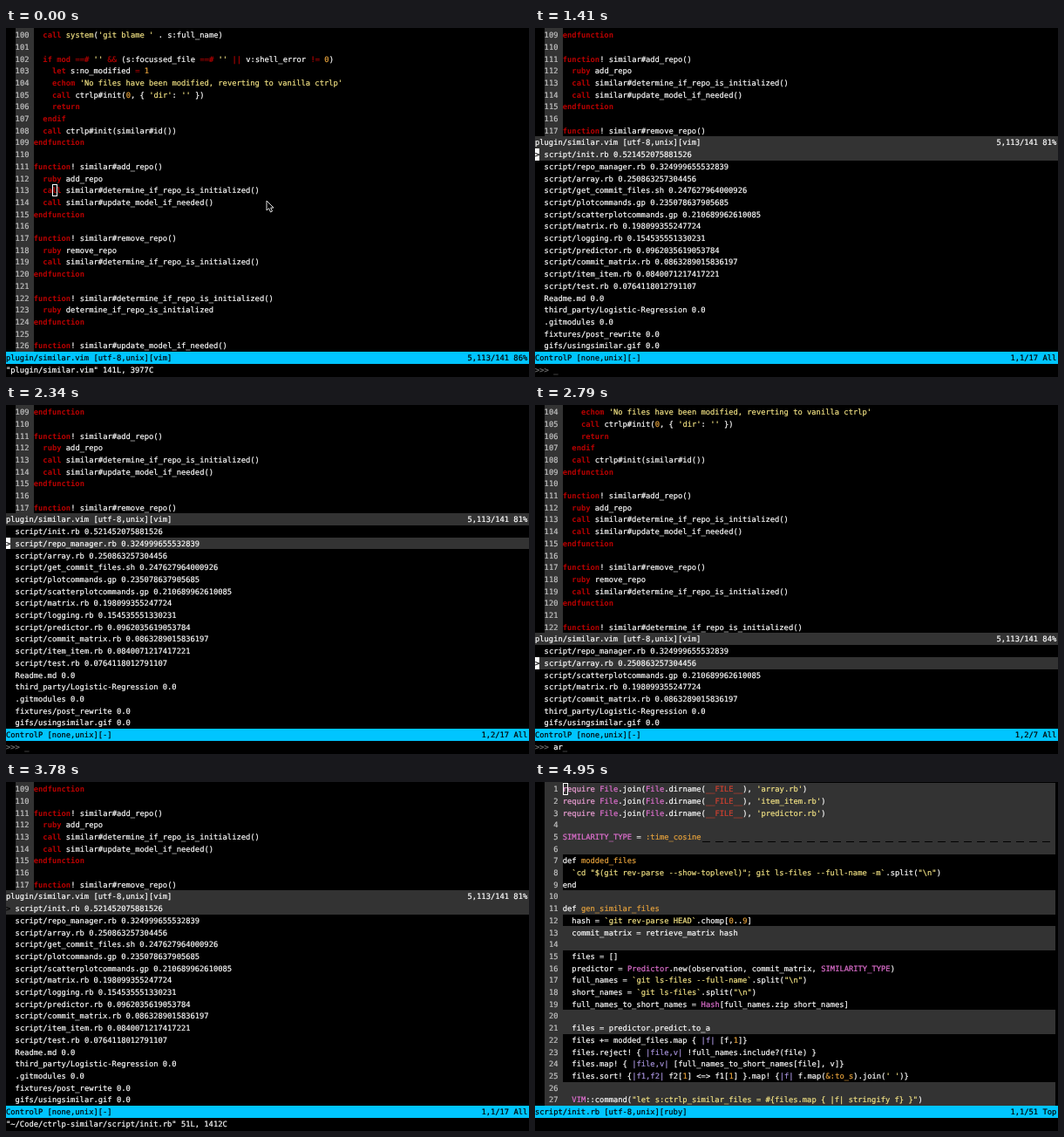
Animation of 600 by 400 pixels, one loop 4980 ms. Source, as an HTML page with a canvas:

```html
<!DOCTYPE html>
<html lang="en">
<head>
<meta charset="utf-8">
<title>Similar files in the editor</title>
<style>
html, body { margin: 0; width: 100%; height: 100%; overflow: hidden; background: #000; }
canvas { display: block; }
</style>
</head>
<body>
<canvas id="stage" width="600" height="400"></canvas>
<script>
const ctx = document.getElementById('stage').getContext('2d');
const LOOP = 4980;
const COLS = 113, CELL = 5.295, LINE = 13.7, TOP = 1.1;
const STATUS_ROW = 27, MESSAGE_ROW = 28;
const WHITE = '#fff', GREY = '#333', CYAN = '#00c5ff', RED = '#b80000';
const YELLOW = '#f3e384', ORANGE = '#e8a33c', PINK = '#e070d0', DIM = '#707070';

const vimCode = `  call system('git blame ' . s:full_name)

  if mod ==# '' && (s:focussed_file ==# '' || v:shell_error != 0)
    let s:no_modified = 1
    echom 'No files have been modified, reverting to vanilla ctrlp'
    call ctrlp#init(0, { 'dir': '' })
    return
  endif
  call ctrlp#init(similar#id())
endfunction

function! similar#add_repo()
  ruby add_repo
  call similar#determine_if_repo_is_initialized()
  call similar#update_model_if_needed()
endfunction

function! similar#remove_repo()
  ruby remove_repo
  call similar#determine_if_repo_is_initialized()
endfunction

function! similar#determine_if_repo_is_initialized()
  ruby determine_if_repo_is_initialized
endfunction

function! similar#update_model_if_needed()`.split('\n');

const rubyCode = String.raw`require File.join(File.dirname(__FILE__), 'array.rb')
require File.join(File.dirname(__FILE__), 'item_item.rb')
require File.join(File.dirname(__FILE__), 'predictor.rb')

SIMILARITY_TYPE = :time_cosine

def modded_files
  ~cd "$(git rev-parse --show-toplevel)"; git ls-files --full-name -m~.split("\n")
end

def gen_similar_files
  hash = ~git rev-parse HEAD~.chomp[0..9]
  commit_matrix = retrieve_matrix hash

  files = []
  predictor = Predictor.new(observation, commit_matrix, SIMILARITY_TYPE)
  full_names = ~git ls-files --full-name~.split("\n")
  short_names = ~git ls-files~.split("\n")
  full_names_to_short_names = Hash[full_names.zip short_names]

  files = predictor.predict.to_a
  files += modded_files.map { |f| [f,1]}
  files.reject! { |file,v| !full_names.include?(file) }
  files.map! { |file,v| [full_names_to_short_names[file], v]}
  files.sort! {|f1,f2| f2[1] <=> f1[1] }.map! {|f| f.map(&:to_s).join(' ')}

  VIM::command("let s:ctrlp_similar_files = #{files.map { |f| stringify f} }")`
  .replace(/~/g, '`').split('\n');

const files = `script/init.rb 0.521452075881526
script/repo_manager.rb 0.324999655532839
script/array.rb 0.250863257304456
script/get_commit_files.sh 0.247627964000926
script/plotcommands.gp 0.235078637905685
script/scatterplotcommands.gp 0.210689962610085
script/matrix.rb 0.198099355247724
script/logging.rb 0.154535551330231
script/predictor.rb 0.0962035619053784
script/commit_matrix.rb 0.0863289015836197
script/item_item.rb 0.0840071217417221
script/test.rb 0.0764118012791107
Readme.md 0.0
third_party/Logistic-Regression 0.0
.gitmodules 0.0
fixtures/post_rewrite 0.0
gifs/usingsimilar.gif 0.0`.split('\n');

// Each rule: pattern, colour, weight.
const raw = String.raw;
const vimRules = [
  [raw`'[^']*'`, YELLOW],
  [raw`\b(?:endfunction|function|endif|if|call|let|echom|return|ruby|mod)\b`, RED, 'bold'],
  [raw`==#|!=|&&|\|\||=`, RED],
  [raw`\bsystem\b`, YELLOW],
  [raw`\b\d+\b`, ORANGE],
];
const rubyRules = [
  [raw`\x60[^\x60]*\x60|'[^']*'|"[^"]*"`, YELLOW],
  [raw`__FILE__`, '#d04030'],
  [raw`\brequire\b`, '#f0a0d8'],
  [raw`\b(?:File|Predictor|Hash|VIM|SIMILARITY_TYPE)\b`, PINK],
  [raw`\b(?:modded_files|gen_similar_files)$`, ORANGE],
  [raw`&?:(?:time_cosine|to_s)`, ORANGE],
  [raw`\|[\w,]+\|`, '#a994de'],
  [raw`\b\d\b`, ORANGE],
];
const rubyBands = [[1, 6], [10, 11], [13, 14], [20, 21], [26, 27]];

function tokenise(line, rules) {
  const pattern = new RegExp(rules.map(rule => `(${rule[0]})`).join('|'), 'g');
  const tokens = [];
  let end = 0;
  for (const match of line.matchAll(pattern)) {
    tokens.push([end, line.slice(end, match.index), WHITE]);
    const rule = rules[match.slice(1).findIndex(group => group !== undefined)];
    tokens.push([match.index, match[0], rule[1], rule[2]]);
    end = match.index + match[0].length;
  }
  tokens.push([end, line.slice(end), WHITE]);
  return tokens;
}
const vimTokens = vimCode.map(line => tokenise(line, vimRules));
const rubyTokens = rubyCode.map(line => tokenise(line, rubyRules));

const rowTop = row => TOP + row * LINE;

function text(row, col, value, colour = WHITE, weight = '') {
  ctx.font = `${weight} 8.797px "DejaVu Sans Mono", monospace`;
  ctx.fillStyle = ctx.strokeStyle = colour;
  ctx.lineWidth = 0.2;
  const x = col * CELL, y = rowTop(row) + 10;
  ctx.fillText(value, x, y);
  if (!weight) ctx.strokeText(value, x, y);
}

function band(row, colour, x = 0, width = 600) {
  ctx.fillStyle = colour;
  const y = Math.round(rowTop(row));
  ctx.fillRect(x, y, width, Math.round(rowTop(row + 1)) - y);
}

function status(row, left, right, active) {
  const colour = active ? '#000' : WHITE;
  band(row, active ? CYAN : GREY);
  text(row, 0, left, colour);
  text(row, COLS - right.length, right, colour);
}

function code(tokens, first, offset, rows) {
  ctx.fillStyle = GREY;
  ctx.fillRect(11, 0, 21, rowTop(rows));
  for (let row = 0; row < rows; row++) {
    const number = String(first + row);
    text(row, 5 - number.length, number, '#c4c4c4');
    for (const [col, value, colour, weight] of tokens[first - offset + row]) {
      text(row, 6 + col, value, colour, weight);
    }
  }
}

function cursor(row, col) {
  ctx.strokeStyle = WHITE;
  ctx.lineWidth = 1;
  ctx.strokeRect(Math.round(col * CELL) + 0.5, Math.round(rowTop(row)) + 0.5, 5, 13);
}

function pointer(x, y) {
  ctx.beginPath();
  [[0, 0], [0, 11], [2.6, 8.7], [4.5, 13], [6.5, 12], [4.7, 8], [8, 8]]
    .forEach(([dx, dy]) => ctx.lineTo(x + dx, y + dy));
  ctx.closePath();
  ctx.fillStyle = '#000';
  ctx.fill();
  ctx.strokeStyle = '#ddd';
  ctx.lineWidth = 1;
  ctx.stroke();
}

// Line 113 stays centred in the rows available.
function codePane(rows, active) {
  const first = 113 - Math.floor(rows / 2);
  code(vimTokens, first, 100, rows);
  const percent = Math.floor((first - 1) / (141 - rows) * 100);
  status(rows, 'plugin/similar.vim [utf-8,unix][vim]', `5,113/141 ${percent}%`, active);
}

function editor(t) {
  codePane(STATUS_ROW, true);
  text(MESSAGE_ROW, 0, '"plugin/similar.vim" 141L, 3977C');
  cursor(13, 10);
  const p = Math.min(1, Math.max(0, (t - 30) / 480));
  const ease = p * p * (3 - 2 * p);
  pointer(299 + 9 * ease, 198 - 21 * ease);
}

function finder(query, selected, opening) {
  const pattern = new RegExp([...query].join('.*'));
  const matches = files.filter(file => pattern.test(file.split(' ')[0]));
  const rows = STATUS_ROW - 1 - matches.length;
  codePane(rows, false);
  matches.forEach((file, i) => {
    const row = rows + 1 + i;
    if (i === selected) {
      band(row, GREY);
      if (!opening) band(row, WHITE, 0, 5);
      text(row, 0, '>', '#000');
    }
    text(row, 2, file);
  });
  status(STATUS_ROW, 'ControlP [none,unix][-]', `1,${selected + 1}/${matches.length} All`, true);
  if (opening) {
    text(MESSAGE_ROW, 0, '"~/Code/ctrlp-similar/script/init.rb" 51L, 1412C');
  } else {
    text(MESSAGE_ROW, 0, '>>>', DIM);
    text(MESSAGE_ROW, 4, query);
    text(MESSAGE_ROW, 4 + query.length, '_', DIM);
  }
}

function openedFile() {
  for (const [from, to] of rubyBands) {
    for (let line = from; line <= to; line++) band(line - 1, GREY, 32, 565);
  }
  ctx.strokeStyle = '#000';
  ctx.lineWidth = 1;
  ctx.setLineDash([9, 6]);
  ctx.beginPath();
  ctx.moveTo(192, 68.5);
  ctx.lineTo(598, 68.5);
  ctx.stroke();
  ctx.setLineDash([]);
  code(rubyTokens, 1, 1, STATUS_ROW);
  status(STATUS_ROW, 'script/init.rb [utf-8,unix][ruby]', '1,1/51 Top', true);
  cursor(0, 6);
}

const scenes = [
  [0, editor],
  [1260, () => finder('', 0)],
  [1560, () => finder('', 1)],
  [2430, () => finder('a', 1)],
  [2580, () => finder('ar', 1)],
  [3000, () => finder('a', 1)],
  [3120, () => finder('', 1)],
  [3420, () => finder('', 0)],
  [3780, () => finder('', 0, true)],
  [3810, openedFile],
];

function draw(now) {
  const t = now % LOOP;
  ctx.textRendering = 'geometricPrecision';
  ctx.fillStyle = '#000';
  ctx.fillRect(0, 0, 600, 400);
  scenes.filter(scene => scene[0] <= t).pop()[1](t);
}

const start = performance.now();
function tick() {
  draw(performance.now() - start);
  requestAnimationFrame(tick);
}
tick();
</script>
</body>
</html>
```
